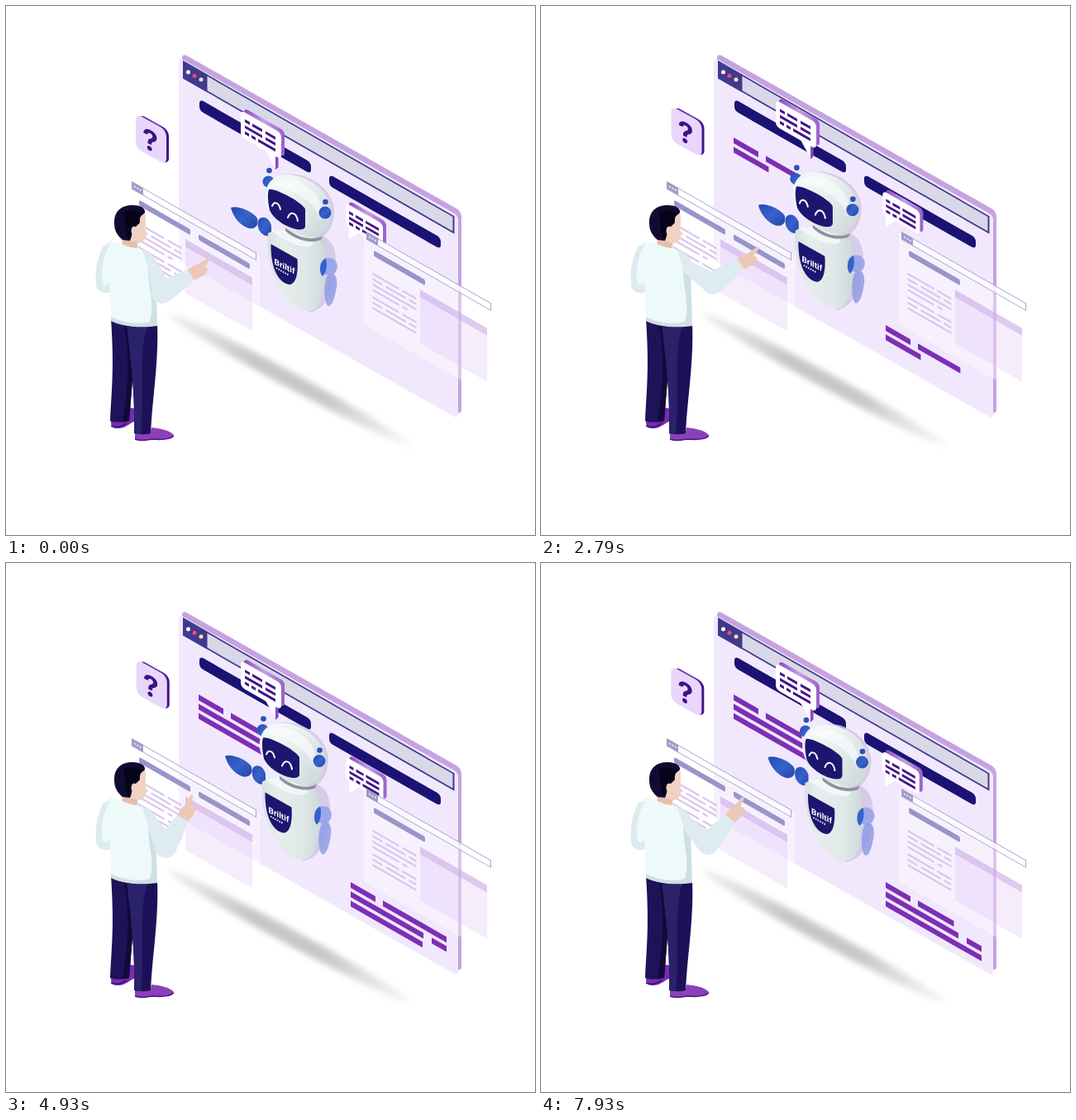
Recreate the animation shown at these times as an HTML page. Size 640 by 640 pixels, loop 8000 ms.

```html
<!DOCTYPE html>
<html lang="en">
<head>
<meta charset="utf-8">
<title>Assistant robot</title>
<style>
html, body { margin: 0; height: 100%; overflow: hidden; background: #fff; }
svg { display: block; width: 100vw; height: 100vh; }
text { font-family: Inter, "Open Sans", sans-serif; text-anchor: middle; }
</style>
</head>
<body>
<svg viewBox="0 0 640 640">
<defs>
  <linearGradient id="shell" x1="0" y1="0" x2="1" y2=".8">
    <stop offset=".3" stop-color="#f0f6f5"/><stop offset=".65" stop-color="#e0e9e8"/><stop offset="1" stop-color="#cfd9db"/>
  </linearGradient>
  <linearGradient id="torso" x1="0" x2="1">
    <stop offset="0" stop-color="#d8e2e1"/><stop offset=".25" stop-color="#e6eeed"/><stop offset=".7" stop-color="#dfe8e7"/><stop offset="1" stop-color="#cdd8d9"/>
  </linearGradient>
  <linearGradient id="blue" x1="0" y1="0" x2="1" y2="1">
    <stop offset="0" stop-color="#264bb2"/><stop offset=".5" stop-color="#3762cb"/><stop offset="1" stop-color="#2346a8"/>
  </linearGradient>
  <linearGradient id="edge" x1="0" x2="1">
    <stop offset="0" stop-color="#5a2399"/><stop offset=".6" stop-color="#7435b0"/><stop offset="1" stop-color="#3d1283"/>
  </linearGradient>
  <linearGradient id="bubbleEdge" x1="0" x2="1">
    <stop offset="0" stop-color="#8d45c4"/><stop offset=".5" stop-color="#c5a0e6"/><stop offset="1" stop-color="#9a5fca"/>
  </linearGradient>
  <linearGradient id="shade" x1="0" x2="1">
    <stop offset="0" stop-color="#ccc" stop-opacity=".3"/><stop offset=".35" stop-color="#c6c6c6"/>
    <stop offset=".65" stop-color="#c8c8c8"/><stop offset="1" stop-color="#d4d4d4" stop-opacity=".2"/>
  </linearGradient>
  <filter id="blur" x="-20%" y="-100%" width="140%" height="300%"><feGaussianBlur stdDeviation="3.5"/></filter>

  <g id="window" transform="matrix(1 .573 0 1 152 212)">
    <rect x="-3" y="2" width="158" height="112" fill="#fff" opacity=".38"/>
    <rect x=".5" y=".5" width="150" height="8.5" fill="#fff" fill-opacity=".7" stroke="#a7a4cf"/>
    <path d="M0 0h14v9h-14z" fill="#a09dca"/>
    <path d="M3 4.5h1.8m1.6 0h1.8m1.6 0h1.8" stroke="#fff" stroke-width="1.6"/>
    <rect x="9" y="17.5" width="62" height="7" rx="2" fill="#9a95c9"/>
    <path d="M65 33h81v65h-81z" fill="#d9b8f3" opacity=".27"/>
    <path d="M65 33h81v9h-81z" fill="#c9a9e4" opacity=".5"/>
    <path d="M7.5 46.5h32m4 0h17M7.5 53h12m4 0h24m4 0h9M7.5 59.5h53M7.5 66h32m4 0h6
      M7.5 75h32m4 0h17M7.5 81.5h12m4 0h24m4 0h9M7.5 88h53" fill="none" stroke="#dac5ed" stroke-width="2.5"/>
  </g>
</defs>

<!-- floor shadow -->
<ellipse cx="343" cy="452" rx="168" ry="9.5" transform="rotate(28.5 343 452)" fill="url(#shade)" filter="url(#blur)"/>

<!-- browser panel -->
<g transform="matrix(1 .567 0 1 209 62)">
  <rect x="4" y="-7.5" width="338" height="246" rx="6" fill="#c5a3e0"/>
  <rect width="338" height="246" rx="5" fill="#f2e8fd"/>
</g>
<g transform="matrix(1 .573 0 1 214 66)">
  <rect x="1" y="1" width="326.5" height="19.5" fill="#d9d8e8" stroke="#403a8e" stroke-width="2"/>
  <path d="M0 0h29.5v21.5h-29.5z" fill="#403a8e"/>
</g>
<circle cx="220.5" cy="80" r="2.5" fill="#fff"/>
<circle cx="228" cy="84.5" r="2.5" fill="#e0526e"/>
<circle cx="236" cy="89" r="2.5" fill="#fbe3a0"/>
<g fill="#1a1374">
  <rect width="135" height="14" rx="5" transform="matrix(1 .57 0 1 234 112.5)"/>
  <rect width="135" height="14" rx="5" transform="matrix(1 .57 0 1 391 203.5)"/>
</g>

<path id="typed" fill="#7d2fb4" transform="matrix(1 .571 0 1 233 159)"/>
<use href="#typed" transform="translate(184 227)"/>

<g id="tile">
  <rect x="4" y="-4" width="36" height="42" rx="7" transform="matrix(1 .55 0 1 157 132)" fill="url(#edge)"/>
  <rect width="37" height="42" rx="7" transform="matrix(1 .55 0 1 157 130)" fill="#e8d7fb"/>
  <text transform="matrix(1 .45 0 1 174.5 175)" font-size="34" font-weight="700" fill="#3f1286">?</text>
</g>

<g id="bubbleA">
  <rect x="4" y="-5" width="49" height="32" rx="5" transform="matrix(1 .571 0 1 284 126)" fill="url(#bubbleEdge)"/>
  <path d="M322 178L329.5 183V195L326 198Z" fill="#8d45c4"/>
  <path d="M311 169L326 197V178Z" fill="#fff"/>
  <g transform="matrix(1 .571 0 1 284 126)">
    <rect width="49" height="32" rx="5" fill="#fff"/>
    <path d="M5 10h6m3 0h12m4 0h12M5 17.3h21m4 0h12M5 24.5h5m3 0h5m3 0h21" stroke="#441389" stroke-width="3.4" fill="none"/>
  </g>
</g>
<g id="bubbleB">
  <rect x="4" y="-5" width="45" height="29" rx="5" transform="matrix(1 .571 0 1 411 238)" fill="url(#bubbleEdge)"/>
  <path d="M414 262L415 282L431 272Z" fill="#fff"/>
  <g transform="matrix(1 .571 0 1 411 238)">
    <rect width="45" height="28" rx="5" fill="#fff"/>
    <path d="M4 9.5h5m3 0h9m3 0h16M4 16h17m3 0h16M4 22.5h5m3 0h5m3 0h20" stroke="#441389" stroke-width="3.2" fill="none"/>
  </g>
</g>

<use href="#window"/>
<rect width="62" height="7" rx="2" transform="matrix(1 .573 0 1 233 276)" fill="#9a95c9"/>
<use href="#window" transform="translate(284 61)"/>

<g id="robot">
  <!-- translucent far side -->
  <g fill="#d3c8e2" opacity=".85">
    <path d="M335 204C365 199 398 222 397 250C396 268 386 281 374 283L352 262Z"/>
    <path d="M372 276C390 276 400 290 399 310C399 342 388 368 366 371L350 330Z"/>
  </g>
  <circle cx="318.5" cy="199" r="3.3" fill="#2b50b5"/>
  <circle cx="317.5" cy="212.5" r="7" fill="url(#blue)"/>
  <path d="M272 244C281 241 299 249 304 257C306 266 301 270 294 269C284 266 275 256 272 244Z" fill="url(#blue)"/>
  <path d="M307 257C313 253 320 259 321 266L321 277C315 281 306 275 305 267C304 262 305 259 307 257Z" fill="url(#blue)"/>
  <path d="M317 275C330 266 372 274 383 287C389 308 388 345 378 362C372 372 358 372 345 361C329 347 313 309 317 275Z" fill="url(#torso)"/>
  <path d="M321 272C336 268 362 276 372 287C368 296 345 290 321 272Z" fill="#f6faf9" opacity=".8"/>
  <path d="M338 268C352 280 370 285 383 278L381 283C367 288 350 283 338 272Z" fill="#8f919b"/>
  <path d="M314 234C312 214 325 203 342 204C368 206 393 224 393 250C393 268 382 280 366 279C346 277 316 258 314 234Z" fill="url(#shell)"/>
  <path d="M322 216C330 206 352 208 368 221C380 231 384 243 380 258C374 238 352 222 322 216Z" fill="#fff" opacity=".55"/>
  <path d="M318 222C324 219 360 238 362 246V267C359 277 326 264 319 247C317 238 316 228 318 222Z" fill="#1c1670"/>
  <path d="M322 242C324 236 330 237 332 246M341 256C344 248 351 249 353 260" fill="none" stroke="#fff" stroke-width="2" stroke-linecap="round"/>
  <circle cx="386" cy="250" r="7.5" fill="url(#blue)"/>
  <circle cx="386.5" cy="237" r="3.3" fill="#2b50b5"/>
  <path d="M320.5 288L352.5 306C353.5 320 352 336 343 337C329 335 320 316 320.5 288Z" fill="#1c1670"/>
  <text transform="matrix(1 .5 0 1 337 318.5)" font-size="10" font-weight="700" fill="#fff" style="font-family:Roboto,sans-serif">Briltif</text>
  <path d="M327 317L342 325.5" stroke="#fff" stroke-width="1.8" stroke-dasharray="1.6 1.4"/>
  <circle cx="390.5" cy="315" r="10.5" fill="#8fa0ea" opacity=".85"/>
  <path d="M387 305C379 309 378 322 383 327C388 322 389 312 387 305Z" fill="#3561cb"/>
  <path d="M389 326C396 320 402 327 400 340C398 352 395 363 390 363C384 360 384 334 389 326Z" fill="#919be3" opacity=".85"/>
</g>

<!-- man -->
<g>
  <path d="M127 502C137 504 145 499 150 486L157 487V502C150 504 144 512 134 511C128 511 127 508 127 502Z" fill="#7a2bb0"/>
  <path d="M127 508C136 511 141 508 146 505" fill="none" stroke="#35106a" stroke-width="1.5"/>
  <path d="M127 378L160 388L154 440L149 502C142 504 132 504 126 502C128 460 131 440 127 378Z" fill="#1e1259"/>
  <path d="M143 386L160 388L154 440L149 502L141 503C148 460 150 430 143 386Z" fill="#130939"/>
  <path d="M156 517L175 515L176 510C186 511 198 513 203 519C203 524 190 525 176 524C168 526 160 527 156 524Z" fill="#8b40b9"/>
  <path d="M156 524C163 527 170 525 177 524C188 525 199 524 203 520" fill="none" stroke="#4b1683" stroke-width="1.5"/>
  <path d="M146 386L183 385C185 430 177 475 175 517C168 519 160 518 155 517C156 470 152 435 146 386Z" fill="#1d1059"/>
  <path d="M146 386L171 388C160 420 168 470 163 518L155 517C156 470 152 435 146 386Z" fill="#2a226a"/>
  <path d="M141 280L160 284L158 296L140 292Z" fill="#e5bfae"/>
  <path d="M152 262L160 253L168 249C170 258 168 266 169 272C171 279 167 286 160 287L150 284Z" fill="#efd2c4"/>
  <path d="M126 284C140 286 150 294 161 293C172 298 180 306 181 322L183 386C165 390 140 388 127 380L126 346C117 349 110 345 109 338C109 318 114 291 126 284Z" fill="#eef9f9"/>
  <path d="M118 290C107 310 108 330 110 342C116 348 122 348 126 346L125 334C120 342 115 338 116 322C117 308 119 300 126 288Z" fill="#dcebee"/>
  <path d="M172 320C173 350 180 358 174 382C160 386 140 383 127 376V381C140 388 165 390 183 387L181 322Z" fill="#cfe0e5"/>
  <path d="M131 263C130 247 142 240 154 241C163 241 169 245 168 250C164 254 161 254 162 262L157 267C153 268 153 278 150 284L141 283C135 278 131 272 131 263Z" fill="#100c31"/>
  <path d="M142 250C150 244 160 250 167 250C161 254 162 258 161 263L154 268L150 283C142 276 146 262 142 250Z" fill="#06041a"/>
  <ellipse cx="155" cy="272" rx="3.5" ry="5.5" fill="#efd2c4"/>
</g>
<path id="upperArm" fill="#deebf0"/>
<g id="forearm">
  <path transform="rotate(-5 40 0)" d="M37-6C44-7 50-7 56-4L70-2.5Q73-.5 69 1L59 3C63 6 61 11 55 10.500C49 11 44 9 37 7Z" fill="#ecc9b7"/>
  <path d="M0-13C14-13 28-8.500 41-7.500V7.500C28 10 12 13 0 13A13 13 0 0 1 0-13Z" fill="#deebf0"/>
</g>
</svg>

<script>
const LOOP = 8000;
const byId = id => document.getElementById(id);
const clamp = (v, lo, hi) => Math.min(hi, Math.max(lo, v));
const wave = (t, peak) => Math.cos(2 * Math.PI * (t - peak) / 6100);

// Smooth curve through [time, value] points, held at both ends.
function track(points, t) {
  const last = points.length - 1;
  t = clamp(t, points[0][0], points[last][0]);
  let i = 0;
  while (i < last - 1 && t > points[i + 1][0]) i++;
  const slope = k => {
    const a = points[Math.max(k - 1, 0)], b = points[Math.min(k + 1, last)];
    return (b[1] - a[1]) / (b[0] - a[0]);
  };
  const [t0, v0] = points[i], [t1, v1] = points[i + 1];
  const d = t1 - t0, u = (t - t0) / d, w = 1 - u;
  return w * w * ((1 + 2 * u) * v0 + u * d * slope(i)) + u * u * ((3 - 2 * u) * v1 - w * d * slope(i + 1));
}

const zip = (times, values) => times.map((t, i) => [t, values[i]]);
const poses = [0, 1290, 2210, 3430, 4930, 5860, 7930];
const robotX = zip(poses, [0, -4.5, -8, -9.5, -7, -4, 2.5]);
const robotY = zip(poses, [0, 1, -1, -6, -10.5, -12, -9]);
const elbowX = zip(poses, [189, 199, 206, 207, 193, 186, 202]);
const elbowY = zip(poses, [347, 343, 337, 336, 344, 348, 340]);
const armAngle = zip(poses, [-33, -35.5, -36, -37, -60, -69, -50]);
const tileY = [[0, 0], [860, 0.3], [1290, 0], [2210, -4], [3430, -14.8], [4150, -16.3], [4930, -13.5], [5860, -5], [6900, -0.3], [7930, -5.5]];

const LINE = 116;
const typing = [[0, 0], [220, 7], [650, 24], [1070, 44], [1570, 65], [1930, 82], [2790, 112], [3060, LINE]];
const lines = [[[0, 30], [39, LINE]], [[0, 88], [98, LINE]], [[0, LINE]]];

// Each line is typed after the one above, then wiped from its end.
function typedPath(t) {
  let d = "";
  lines.forEach((segments, i) => {
    const width = track(typing, t - 640 - i * 1115) - track(typing, t - 7080 - i * 1115);
    for (const [from, to] of segments)
      if (width > from) d += `M${from} ${i * 11.3}H${Math.min(to, width)}v7H${from}z`;
  });
  return d;
}

const move = (id, x, y) => byId(id).setAttribute("transform", `translate(${x} ${y})`);

function draw(t) {
  move("robot", track(robotX, t), track(robotY, t));
  const lift = track(tileY, t);
  move("tile", -lift / 18, lift);
  move("bubbleA", 0, 8 * wave(t, 500) - 7);
  const drift = -7.5 * wave(t, 2850) - 7.3;
  move("bubbleB", -drift * 0.16, drift);
  byId("typed").setAttribute("d", typedPath(t));

  const x = track(elbowX, t), y = track(elbowY, t);
  byId("upperArm").setAttribute("d", `M165 295Q177 298 183 310L${x + 11} ${y - 8}L${x - 11} ${y + 7}L173 322Z`);
  byId("forearm").setAttribute("transform", `translate(${x} ${y}) rotate(${track(armAngle, t)})`);
}

const start = performance.now();
function tick() {
  draw((performance.now() - start) % LOOP);
  requestAnimationFrame(tick);
}
tick();
</script>
</body>
</html>
```
